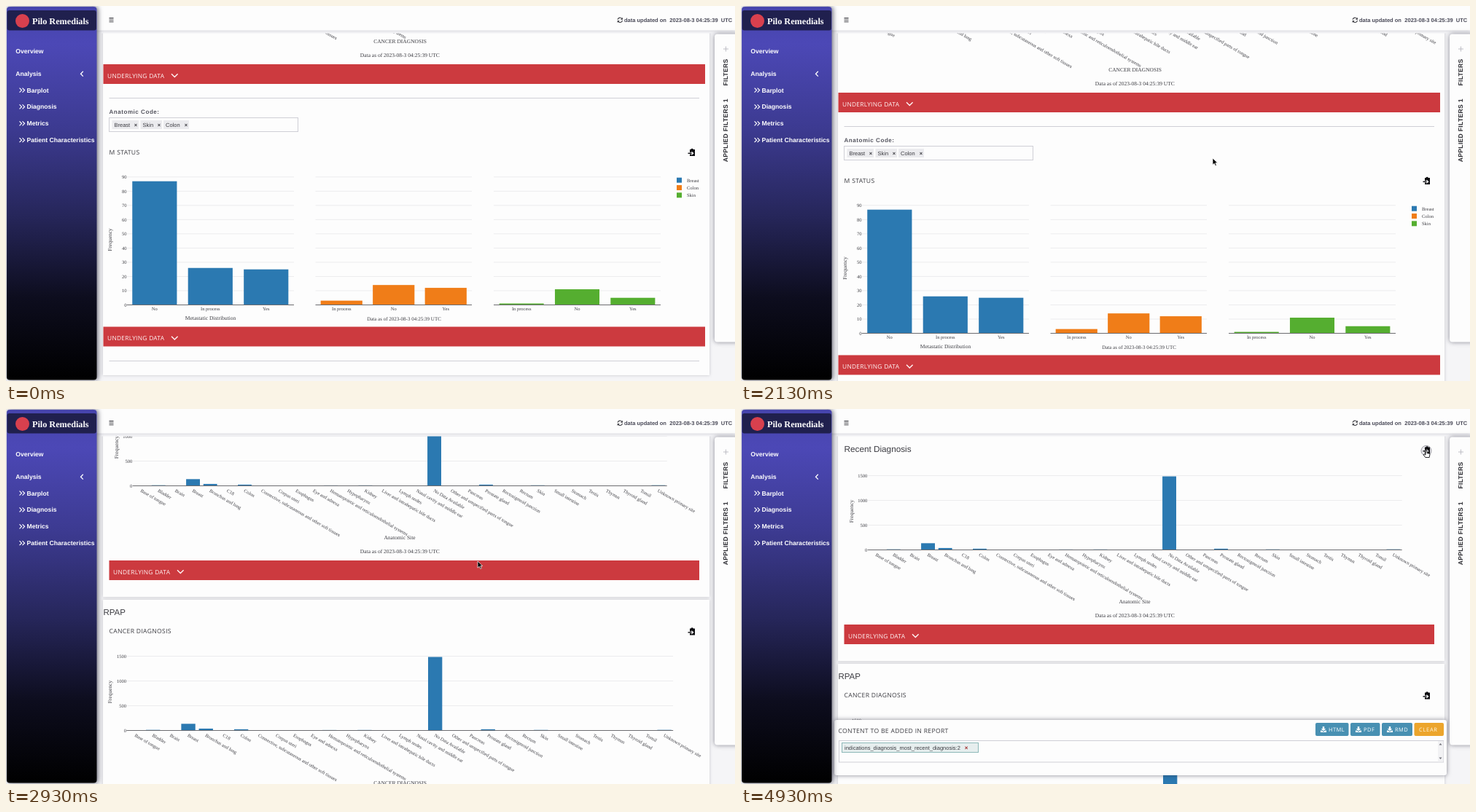
These frames come from a looping animation (1000x515 px, 4.99 s). An HTML page:

```html
<!DOCTYPE html>
<html lang="en">
<head>
<meta charset="utf-8">
<title>Report dashboard</title>
<style>
html, body { margin: 0; width: 100%; height: 100%; overflow: hidden; background: #f5f5f7; }
svg { display: block; width: 1000px; height: 515px; text-rendering: geometricPrecision; }
text { white-space: pre; }
.sans { font-family: "Liberation Sans", Arial, sans-serif; }
.open { font-family: "Open Sans", "Noto Sans", sans-serif; }
.serif { font-family: "Liberation Serif", Times, serif; }
.bold { font-weight: bold; }
.card { fill: #fdfdfd; filter: drop-shadow(0 0 2px rgba(60, 60, 80, .25)); }
.float { fill: #fdfdfd; filter: drop-shadow(0 0 3px rgba(40, 40, 60, .55)); }
</style>
</head>
<body>
<svg id="stage" viewBox="0 0 1000 515"></svg>
<script>
const INK = '#3c3c42', PAPER = '#fdfdfd', GRID = '#ececee', RULE = '#cfcfd6', AXIS = '#6c6c70';
const BLUE = '#2b79b1', ORANGE = '#f07d18', GREEN = '#55ae30', RED = '#cc3a3f';
const STAMP = '2023-08-3 04:25:39';

// ---- drawing helpers; y of a text is its visual middle ----
const rect = (x, y, w, h, fill, extra = '') =>
  `<rect x="${x}" y="${y}" width="${w}" height="${h}" fill="${fill}" ${extra}/>`;
const line = (x1, y1, x2, y2, color, width = 1) =>
  `<path d="M${x1} ${y1}L${x2} ${y2}" stroke="${color}" stroke-width="${width}"/>`;
const stroke = (d, color, width = 1, extra = '') =>
  `<path d="${d}" fill="none" stroke="${color}" stroke-width="${width}" ${extra}/>`;
const shape = (d, fill, extra = '') => `<path d="${d}" fill="${fill}" ${extra}/>`;
const at = (x, y, body, extra = '') => `<g transform="translate(${x} ${y})" ${extra}>${body}</g>`;

function text(s, x, y, size, cls, { fill = INK, anchor = 'start', gap = 0, turn = 0 } = {}) {
  const place = turn ? `transform="translate(${x} ${y}) rotate(${turn})" y="${size * .34}"`
                     : `x="${x}" y="${y + size * .34}"`;
  return `<text ${place} class="${cls}" font-size="${size}" fill="${fill}" text-anchor="${anchor}" letter-spacing="${gap}">${s}</text>`;
}
const serif = (s, x, y, size = 7.5, anchor = 'middle', turn = 0) => text(s, x, y, size, 'serif', { anchor, turn });
const heading = (s, x, y) => text(s, x, y, 8.6, 'open', { gap: .32 });

// ---- repeated parts ----
const clipIcon = (x, y) => at(x, y,
  shape('M-3 -4H-1.6A1.8 1.8 0 0 1 1.8 -4H4V5H-3V2.6H-.5V4L2.6 1.2L-.5 -1.6V0H-3Z', '#0c0c10') +
  shape('M-5.5 .6H-.5V2H-5.5Z', '#0c0c10'));

const dataBar = (x, y, w) => rect(x, y, w, 27, RED) +
  text('UNDERLYING DATA', x + 5.5, y + 15.7, 8.4, 'open', { fill: '#fff4f4', gap: .28 }) +
  stroke(`M${x + 93.5} ${y + 13.2}l4.3 4.3l4.3 -4.3`, '#fff4f4', 1.4);

function modeBar(id, x, y) {
  const pale = '#bcbcc4', dark = '#5c5c66';
  const icons = [
    [0, rect(-4, -2.5, 8, 6, 'none', `stroke="${pale}"`) + rect(-1.5, -4, 3, 2, pale) + `<circle r="1.4" cy=".5" fill="${pale}"/>`],
    [17, `<circle cx="-.6" cy="-.6" r="2.9" fill="none" stroke="${dark}" stroke-width="1.3"/>` + line(1.5, 1.5, 4, 4, dark, 1.5) + line(-2, -.6, 1, -.6, dark)],
    [30, stroke('M-4 0H4M0 -4V4', pale, 1.3)],
    [43, rect(-3.5, -3.5, 7, 7, 'none', `stroke="${pale}" stroke-dasharray="2 1"`)],
    [56, `<ellipse rx="3.8" ry="2.5" cy="-1" fill="none" stroke="${pale}"/>` + line(-2, 1, -1, 4, pale)],
    [73, rect(-3.5, -3.5, 7, 7, pale) + stroke('M-2 0H2M0 -2V2', PAPER)],
    [86, rect(-3.5, -3.5, 7, 7, pale) + stroke('M-2 0H2', PAPER)],
    [99, stroke('M-3.5 -3.5L3.5 3.5M3.5 -3.5L-3.5 3.5', pale, 1.2)],
    [112, shape('M-4 0L0 -4L4 0H3V4H1V1H-1V4H-3V0Z', pale)],
    [129, shape('M-4 0L-2 -2H4V2H-2Z', dark)],
    [142, shape('M-4 -3H4V-.5H-4ZM-4 .8H4V3H-4Z', pale)],
    [159, rect(-4, -4, 8, 8, dark) + stroke('M-2 3V0M0 3V-2M2 3V-1', PAPER, .9)]
  ];
  return at(x, y, icons.map(([dx, body]) => at(dx, 0, body)).join(''), `id="${id}" opacity="0"`);
}

const SITES = ('Base of tongue|Bladder|Brain|Breast|Bronchus and lung|C18|Colon|' +
  'Connective, subcutaneous and other soft tissues|Corpus uteri|Esophagus|Eye and adnexa|' +
  'Hematopoietic and reticuloendothelial systems|Hypopharynx|Kidney|Liver and intrahepatic bile ducts|' +
  'Lymph nodes|Nasal cavity and middle ear|No Data Available|Other and unspecified parts of tongue|' +
  'Pancreas|Prostate gland|Rectosigmoid junction|Rectum|Skin|Small intestine|Stomach|Testis|Thymus|' +
  'Thyroid gland|Tonsil|Unknown primary site').split('|');
const COUNTS = { 1: 12, 3: 135, 4: 38, 6: 24, 11: 9, 13: 10, 17: 1485, 20: 24, 23: 11, 30: 12 };

function siteChart(x0, x1, base, labelX) {
  const step = (x1 - x0) / SITES.length, unit = 34 / 500;
  let out = '';
  for (let v = 0; v <= 1500; v += 500) {
    const y = base - v * unit;
    if (v) out += line(x0, y, x1, y, GRID);
    out += serif(v, x0 - .5, y, 6.5, 'end');
  }
  SITES.forEach((name, i) => {
    const cx = x0 + (i + .5) * step, h = (COUNTS[i] || 2) * unit;
    out += rect(cx - step * .4, base - h, step * .8, h, BLUE);
    out += serif(name, cx - .5, base + 6, 6.5, 'start', 30);
  });
  return out + line(x0, base, x1, base, AXIS) +
    serif('Frequency', labelX, base - 53, 7.5, 'middle', -90);
}

const STATUS_BASE = 963.5, STATUS_UNIT = 1.952;

function statusPanel(x0, x1, color, bars) {
  const step = (x1 - x0) / 3;
  let out = '';
  for (let v = 10; v <= 90; v += 10) {
    const y = STATUS_BASE - v * STATUS_UNIT;
    out += line(x0, y, x1, y, GRID);
  }
  bars.forEach(([name, v], i) => {
    const cx = x0 + (i + .5) * step, h = v * STATUS_UNIT;
    out += rect(cx - step * .4, STATUS_BASE - h, step * .8, h, color) + serif(name, cx, 968.3, 6.5);
  });
  return out + line(x0, STATUS_BASE, x1, STATUS_BASE, AXIS);
}

// ---- scrolling page ----
function page() {
  let out = rect(133, 20, 832, 326, '', 'class="card"') + rect(133, 350, 832, 710, '', 'class="card"');

  out += text('Recent Diagnosis', 141.5, 55.5, 11.75, 'sans') + clipIcon(941, 56.5) +
    siteChart(173.8, 906.7, 193.5, 151) + modeBar('tools1', 784.5, 85.8) +
    serif('Anatomic Site', 540, 264.5) + serif(`Data as of ${STAMP} UTC`, 540.3, 283.7) +
    dataBar(141.5, 296, 809.5);

  out += text('RPAP', 133.5, 367.4, 11.5, 'sans') + heading('CANCER DIAGNOSIS', 141.5, 393) + clipIcon(941, 393.5) +
    siteChart(165.4, 915.2, 529.5, 142.5) + modeBar('tools2', 793, 422.3) +
    serif('CANCER DIAGNOSIS', 540.5, 601) + serif(`Data as of ${STAMP} UTC`, 540.3, 620.2) +
    dataBar(133.5, 633, 825.5);

  out += line(141.5, 679.5, 951, 679.5, RULE) +
    text('Anatomic Code:', 141.5, 698.2, 8, 'sans bold', { fill: '#55555f', gap: .55 }) +
    rect(141.5, 706.5, 259, 19, PAPER, `stroke="${RULE}"`);
  [['Breast', 148.5, 178], ['Skin', 187.5, 210], ['Colon', 219, 247]].forEach(([name, x, cross]) => {
    out += rect(x - 3, 710, cross - x + 7, 12, '#ebebee') + text(name, x, 716, 7.5, 'sans') +
      text('×', cross, 716, 7.5, 'sans bold', { anchor: 'middle' });
  });

  out += heading('M STATUS', 141.5, 753.6) + clipIcon(941, 754);
  for (let v = 0; v <= 90; v += 10) out += serif(v, 165.5, STATUS_BASE - v * STATUS_UNIT, 6.5, 'end');
  out += statusPanel(165.6, 395, BLUE, [['No', 87], ['In process', 26], ['Yes', 25]]) +
    statusPanel(424.5, 639, ORANGE, [['In process', 3], ['No', 14], ['Yes', 12]]) +
    statusPanel(669, 898, GREEN, [['In process', 1], ['No', 11], ['Yes', 5]]) +
    serif('Frequency', 142.5, 874, 7.5, 'middle', -90) +
    serif('Metastatic Distribution', 280.5, 981) + serif(`Data as of ${STAMP} UTC`, 546, 982.8, 7);
  [['Breast', BLUE], ['Colon', ORANGE], ['Skin', GREEN]].forEach(([name, color], i) => {
    out += rect(920, 788.7 + i * 10.3, 7, 7, color) + serif(name, 934, 792.4 + i * 10.3, 6.5, 'start');
  });
  return out + dataBar(133.5, 993.5, 825.5) + line(141.5, 1040.5, 951, 1040.5, RULE);
}

// ---- fixed parts ----
function header() {
  const bold = (s, x) => text(s, x, 19.3, 7.5, 'sans bold', { fill: '#4a4a58' });
  return rect(120, 0, 880, 37.5, '#f5f5f7') + rect(120, 0, 880, 33.5, '', 'class="card"') +
    stroke('M141.5 16.6h6M141.5 19.2h6M141.5 21.8h6', INK, 1.1) +
    at(842.3, 19.3, stroke('M-3.2 -.6A3.2 3.2 0 0 1 2.6 -1.8M3.2 .6A3.2 3.2 0 0 1 -2.6 1.8', INK, 1.1) +
      shape('M3.6 -3.6V-.6H.6ZM-3.6 3.6V.6H-.6Z', INK)) +
    bold('data updated on', 848) + bold(STAMP, 910.3) + bold('UTC', 980.8);
}

function filters() {
  const side = { anchor: 'middle', turn: -90, gap: .3, fill: '#2a2a30' };
  return rect(972, 38.5, 40, 423, '', 'rx="4" class="float"') +
    stroke('M984 59h7M987.5 55.5v7', '#b8b8c0', .9) +
    text('FILTERS', 987.5, 91, 8.5, 'sans bold', side) +
    text('APPLIED FILTERS 1', 987.5, 170.7, 8.6, 'sans bold', side);
}

function sidebar() {
  const white = { fill: '#ffffff' };
  let out = rect(1, 1, 123.5, 512.5, 'url(#night)', 'rx="4" style="filter:drop-shadow(2px 0 3px rgba(30,30,50,.6))"') +
    rect(1.5, 6, 122.5, 27.5, '#20204e', 'rx="3"') +
    `<circle cx="22.5" cy="20.5" r="9.5" fill="#d8404e"/>` +
    text('Pilo Remedials', 36, 21.3, 12.2, 'serif bold', white) +
    text('Overview', 13.3, 62.5, 8.6, 'sans bold', white) +
    text('Analysis', 13.3, 93, 8.6, 'sans bold', white) +
    stroke('M105.8 89.8l-3.3 3.4l3.3 3.4', '#ffffff', 1.3);
  ['Barplot', 'Diagnosis', 'Metrics', 'Patient Characteristics'].forEach((name, i) => {
    const y = 115.6 + i * 22.85;
    out += stroke(`M18.5 ${y - 3}l3 3l-3 3M22.5 ${y - 3}l3 3l-3 3`, '#ffffff', 1.2) +
      text(name, 28.5, y, 8.6, 'sans bold', white);
  });
  return out;
}

function report() {
  let out = rect(128, 427, 840, 76, '', 'rx="3" class="float"') +
    heading('CONTENT TO BE ADDED IN REPORT', 133.5, 441.7);
  [['HTML', 788, 45.5], ['PDF', 836, 40.5], ['RMD', 879, 42]].forEach(([name, x, w]) => {
    out += rect(x, 431, w, 18, '#4890b2', 'rx="2"') +
      at(x + 11, 440, shape('M-1.2 -4H1.2V-1H3.2L0 2.2L-3.2 -1H-1.2ZM-4 1.6H-2L0 3.4L2 1.6H4V4H-4Z', '#ffffff')) +
      text(name, x + 18, 440.3, 7.5, 'open', { fill: '#ffffff', gap: .45 });
  });
  return out + rect(923.5, 431, 40.5, 18, '#eca52c', 'rx="2"') +
    text('CLEAR', 930, 440.3, 7.5, 'open', { fill: '#fff8e4', gap: .7 }) +
    rect(134.5, 455.5, 829, 29.5, PAPER, `stroke="${RULE}"`) +
    rect(956, 456, 7.5, 28.5, '#f2f2f4') +
    shape('M957.5 461.5l2 -2.5l2 2.5ZM957.5 478.5l2 2.5l2 -2.5Z', '#707078') +
    rect(138.5, 458.5, 187, 13, '#e6eeee', 'stroke="#8cb8b8"') +
    text('indications_diagnosis_most_recent_diagnosis:2', 142, 465, 7.5, 'sans') +
    text('×', 309, 465, 8, 'sans bold', { anchor: 'middle', fill: '#a02a2a' });
}

const NIGHT = [[0, '#4644ac'], [.1, '#4c48b6'], [.33, '#3c3a90'], [.56, '#26265a'], [.78, '#0d0d1e'], [1, '#000000']];
const $ = id => document.getElementById(id);

$('stage').innerHTML =
  `<defs><linearGradient id="night" x2="0" y2="1">${NIGHT.map(([o, c]) => `<stop offset="${o}" stop-color="${c}"/>`).join('')}</linearGradient></defs>` +
  rect(0, 0, 1000, 515, '#f5f5f7') +
  `<g id="page">${page()}</g>` +
  `<g id="hover"><circle cx="940" cy="57.3" r="7" fill="#e8e8ec" stroke="#9c9ca4"/>${clipIcon(941, 56.5)}</g>` +
  header() + filters() + `<g id="report">${report()}</g>` + sidebar() +
  `<g id="arrow">${shape('M0 0V9.2L2.2 7.2L3.7 10.4L5.3 9.7L3.8 6.6H6.8Z', '#000000', 'stroke="#ffffff" stroke-width=".7"')}</g>` +
  `<g id="hand">${shape('M-1 0Q0 -1 1 0V3.5L4.2 4.2Q5 4.5 4.9 5.5L4.2 9.5H-1.2L-3.8 6Q-3.6 4.6 -2.2 5.2L-1 6.2Z', '#ffffff', 'stroke="#101014" stroke-width=".9"')}</g>`;

// ---- timeline: rows of [ms, values...] ----
const LOOP = 4990, TICK = 1000 / 15;
const SCROLL = [[1930, 553], [2130, 516], [2530, 290], [2930, 89], [3070, 32], [3200, 0]];
const POINTER = [[530, 690, 0], [800, 668, 130], [1000, 647, 209], [3580, 647, 209],
  [3730, 800, 96], [3870, 945, 1], [4000, 947, 10], [4270, 940, 57]];
const TOOLS1 = [[3000, 0], [3130, 1], [3750, 1], [3930, 0]];
const TOOLS2 = [[2300, 0], [2430, 1], [2700, 1], [2900, 0]];

function sample(rows, t) {
  const i = rows.findIndex(row => row[0] > t);
  if (i === 0) return rows[0].slice(1);
  if (i < 0) return rows[rows.length - 1].slice(1);
  const a = rows[i - 1], b = rows[i], k = (t - a[0]) / (b[0] - a[0]);
  return a.slice(1).map((v, j) => v + (b[j + 1] - v) * k);
}
const show = (id, on) => $(id).setAttribute('visibility', on ? 'visible' : 'hidden');
const move = (id, x, y) => $(id).setAttribute('transform', `translate(${x} ${y})`);

function draw(ms) {
  const t = Math.floor((ms % LOOP + 4) / TICK) * TICK;
  const [x, y] = sample(POINTER, t), onButton = t > 4190;
  move('page', 0, -Math.round(sample(SCROLL, t)[0]));
  move('arrow', x, y);
  move('hand', x, y);
  show('arrow', t > 530 && !onButton);
  show('hand', onButton);
  show('hover', onButton);
  show('report', t > 4590);
  $('tools1').setAttribute('opacity', sample(TOOLS1, t)[0]);
  $('tools2').setAttribute('opacity', sample(TOOLS2, t)[0]);
}

const start = performance.now();
function loop() {
  draw(performance.now() - start);
  requestAnimationFrame(loop);
}
loop();
</script>
</body>
</html>
```
